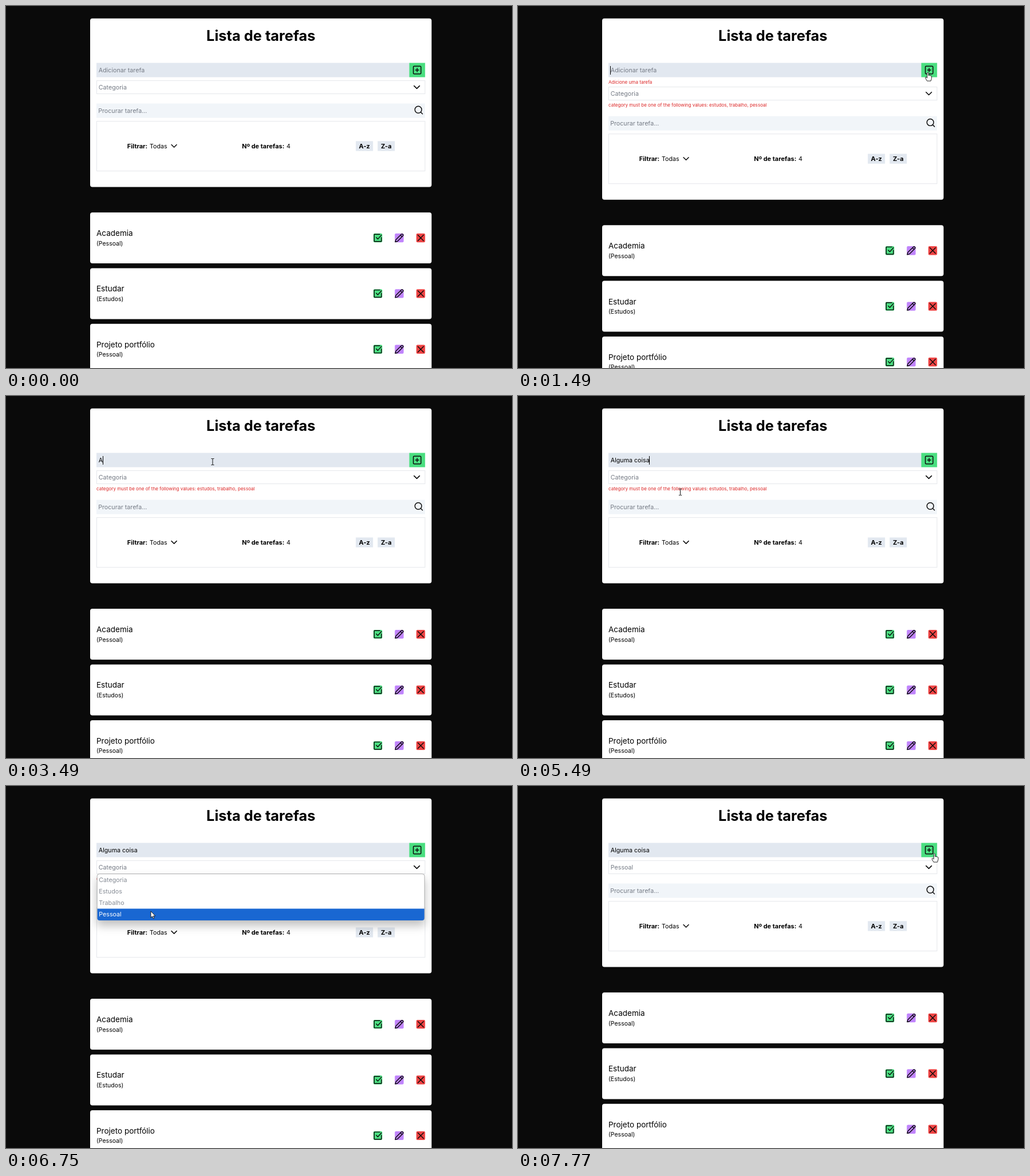
Write an HTML page that moves like this. It is 884 px wide and 633 px high and loops after 8000 ms.

```html
<!DOCTYPE html>
<html lang="pt">
<head>
<meta charset="utf-8">
<title>Lista de tarefas</title>
<style>
  html, body { margin: 0; height: 100%; overflow: hidden; background: #0a0a0a; }
  svg { display: block; width: 884px; height: 633px; }
  text { font: 10.7px Inter, "Open Sans", sans-serif; fill: #000; white-space: pre; }
  .title { font-size: 25.4px; font-weight: 700; text-anchor: middle; }
  .bold { font-size: 11px; font-weight: 700; }
  .mid { text-anchor: middle; }
  .hint { fill: #757b85; }
  .error { font-size: 8.07px; fill: #dc2626; }
  .task { font-size: 13.5px; }
  .tag { font-size: 10.5px; }
  .icon { fill: none; stroke: #0a0a0a; stroke-width: 2; stroke-linecap: round; stroke-linejoin: round; }
  .box { fill: #fff; stroke: #e5e7eb; }
  #menu { filter: drop-shadow(0 9px 8px rgba(0, 0, 0, .25)); }
</style>
</head>
<body>
<svg id="stage" viewBox="0 0 884 633"></svg>
<script>
const LOOP = 8000, ERROR_H = 11.1, ROW_H = 20.2;
const options = ['Categoria', 'Estudos', 'Trabalho', 'Pessoal'];
const tasks = [['Academia', 'Pessoal'], ['Estudar', 'Estudos'], ['Projeto portfólio', 'Pessoal']];

const icons = {
  plus: 'M5 3H19Q21 3 21 5V19Q21 21 19 21H5Q3 21 3 19V5Q3 3 5 3ZM8 12H16M12 8V16',
  chevron: 'M6 9L12 15 18 9',
  search: 'M19 11A8 8 0 1 1 3 11A8 8 0 1 1 19 11M21 21L16.7 16.7',
  check: 'M21 11V20Q21 21 20 21H4Q3 21 3 20V4Q3 3 4 3H17M8 11L12 15 21 5',
  pencil: 'M17 3A2.8 2.8 0 0 1 21 7L7.5 20.5 2 22 3.5 16.5ZM15 5L19 9',
  cross: 'M5 5L19 19M19 5L5 19'
};
const pointers = {
  arrow: 'M0 0V11.2L2.6 8.8 4.3 12.8 6 12 4.3 8.2H7.8Z',
  hand: 'M-1.2 1.2Q0 -.6 1.2 1.2V6L2.2 5.6 3.6 6.3 5 6.2 6.6 7.4V11L5.2 15.6H-1.4L-4.2 10.6Q-4.6 8.6 -3 8.8L-1.2 10.4Z',
  beam: 'M-2.5 -5.5H-.7L0 -5 .7 -5.5H2.5M0 -5V5M-2.5 5.5H-.7L0 5 .7 5.5H2.5'
};

// Tracks: each entry holds from its time until the next one.
const pointerTrack = [
  [0], [250, 'arrow', 861, 470], [500, 'arrow', 798, 325], [750, 'arrow', 736, 160],
  [990, 'hand', 716, 115.5], [1990, 'beam', 520, 116], [2240, 'beam', 361, 115],
  [5490, 'beam', 283.5, 168], [5750, 'arrow', 262, 145], [6000, 'arrow', 253, 161],
  [6250, 'arrow', 250, 190.5], [6500, 'arrow', 251, 203], [6750, 'arrow', 253, 219],
  [7020, 'arrow', 262, 217], [7270, 'arrow', 430, 180], [7520, 'arrow', 640, 142],
  [7770, 'hand', 727.5, 117.5]
];
const typedTrack = [[0, 0], [3490, 1], [3740, 2], [4000, 3], [4250, 5], [4500, 7], [4750, 9], [5000, 12]];
const caretTrack = [[0, 0], [1490, 1], [1990, 0], [2240, 1], [2740, 0], [3260, 1], [5750, 0]];
const errorTrack = [[0, 0, 0], [1490, 1, 1], [3490, 0, 1], [7020, 0, 0]];
const menuTrack = [[0, -1], [6000, 0], [6250, 1], [6500, 2], [6750, 3], [7020, -1]];
const at = (track, t) => track.findLast(k => k[0] <= t).slice(1);

const text = (s, x, y, cls = '', id = '') => `<text id="${id}" class="${cls}" x="${x}" y="${y}">${s}</text>`;
const rect = (x, y, w, h, fill, r = 0) => `<rect x="${x}" y="${y}" width="${w}" height="${h}" rx="${r}" fill="${fill}"/>`;
const box = (x, y, w, h) => `<rect class="box" x="${x}" y="${y}" width="${w}" height="${h}"/>`;
const icon = (name, x, y, s) =>
  `<path class="icon" d="${icons[name]}" transform="translate(${x} ${y}) scale(${s}) translate(-12 -12)"/>`;

const badge = (name, x, y, fill) => rect(x - 7.7, y - 7.7, 15.4, 15.4, fill, 2) + icon(name, x, y, .7);
const card = ([name, tag], i) => {
  const y = 361 + i * 97.4;
  return rect(147, y, 596.5, 89, '#fff', 4) +
    text(name, 158, y + 41, 'task') + text(`(${tag})`, 158, y + 57.5, 'tag') +
    badge('check', 649.6, y + 44.5, '#4ade80') +
    badge('pencil', 687, y + 44.5, '#c084fc') +
    badge('cross', 724.5, y + 44.5, '#ef4444');
};
const chip = (s, x) => rect(x - 15, 236.3, 30, 17.2, '#e2e8f0') + text(s, x, 248.6, 'bold mid');
const option = (s, i) => text(s, 162.3, 167.8 + i * ROW_H, 'hint option');

stage.innerHTML =
  `<rect id="panel" x="147" y="21.7" width="596.5" rx="4" fill="#fff"/>` +
  text('Lista de tarefas', 445.3, 60.5, 'title') +
  rect(158, 99.5, 546.5, 25, '#e2e8f0') + rect(704.5, 99.5, 27.7, 25, '#4ade80') +
  icon('plus', 718.3, 112, .74) +
  text('Adicionar tarefa', 161.8, 116.2, 'hint', 'empty') + text('', 161.8, 116.2, '', 'typed') +
  `<rect id="caret" y="105" width="1" height="15"/>` +
  text('Adicione uma tarefa', 158, 135.8, 'error', 'error1') +
  `<g id="category">` + box(158.5, 130.5, 573.5, 23) + text('', 161.8, 145.6, 'hint', 'chosen') +
  icon('chevron', 717.7, 142, .8) +
  text('category must be one of the following values: estudos, trabalho, pessoal', 158, 164.8, 'error', 'error2') +
  `</g><g id="lower">` +
  rect(158, 170.5, 574, 25, '#f1f5f9') + text('Procurar tarefa...', 161.2, 187, 'hint') + icon('search', 721, 182, .74) +
  box(158.5, 201.5, 573.5, 87) +
  text('Filtrar:', 211.8, 248.6, 'bold') + text('Todas', 251, 248.6) + icon('chevron', 293.6, 244.8, .75) +
  text('Nº de tarefas:', 412.3, 248.6, 'bold') + text('4', 490, 248.6) +
  chip('A-z', 626.2) + chip('Z-a', 664.3) +
  tasks.map(card).join('') +
  `</g><g id="menu"><rect x="159.2" y="153.7" width="572" height="81" rx="4" fill="#fff" stroke="#a8a8a8" stroke-width=".9"/>` +
  `<path id="mark" fill="#1967d2"/>` + options.map(option).join('') +
  `</g><path id="pointer" stroke-linejoin="round"/>`;

const el = id => document.getElementById(id);
const show = (id, on) => el(id).setAttribute('visibility', on ? 'visible' : 'hidden');
const set = (id, attrs) => Object.entries(attrs).forEach(([k, v]) => el(id).setAttribute(k, v));
const optionTexts = document.querySelectorAll('.option');

function draw(t) {
  const [count] = at(typedTrack, t), [caretOn] = at(caretTrack, t);
  const [e1, e2] = at(errorTrack, t), [row] = at(menuTrack, t);
  const [kind, x, y] = at(pointerTrack, t);

  el('typed').textContent = 'Alguma coisa'.slice(0, count);
  show('empty', !count);
  show('caret', caretOn);
  set('caret', { x: Math.round(161.3 + (count ? el('typed').getComputedTextLength() : 0)) });

  const shift = (e1 + e2) * ERROR_H;
  show('error1', e1);
  show('error2', e2);
  set('panel', { height: 294.8 + shift });
  set('category', { transform: `translate(0 ${e1 * ERROR_H})` });
  set('lower', { transform: `translate(0 ${shift})` });
  el('chosen').textContent = options[t < 7020 ? 0 : 3];

  el('menu').style.display = row < 0 ? 'none' : '';
  const top = 153.9 + row * ROW_H;
  const end = row === 3 ? 'v16.4q0 4 -4 4h-563.2q-4 0 -4 -4' : 'v20.2h-571.2';
  set('mark', { d: row > 0 ? `M159.6 ${top}h571.2${end}z` : '' });
  optionTexts.forEach((o, i) => o.style.fill = row > 0 && i === row ? '#fff' : '#858b94');

  show('pointer', kind);
  if (kind) set('pointer', {
    d: pointers[kind], transform: `translate(${x} ${y})`,
    fill: kind === 'beam' ? 'none' : '#fff', stroke: '#111', 'stroke-width': kind === 'beam' ? 1 : .9
  });
}

const start = performance.now();
function tick() {
  draw((performance.now() - start) % LOOP);
  requestAnimationFrame(tick);
}
tick();
</script>
</body>
</html>
```
